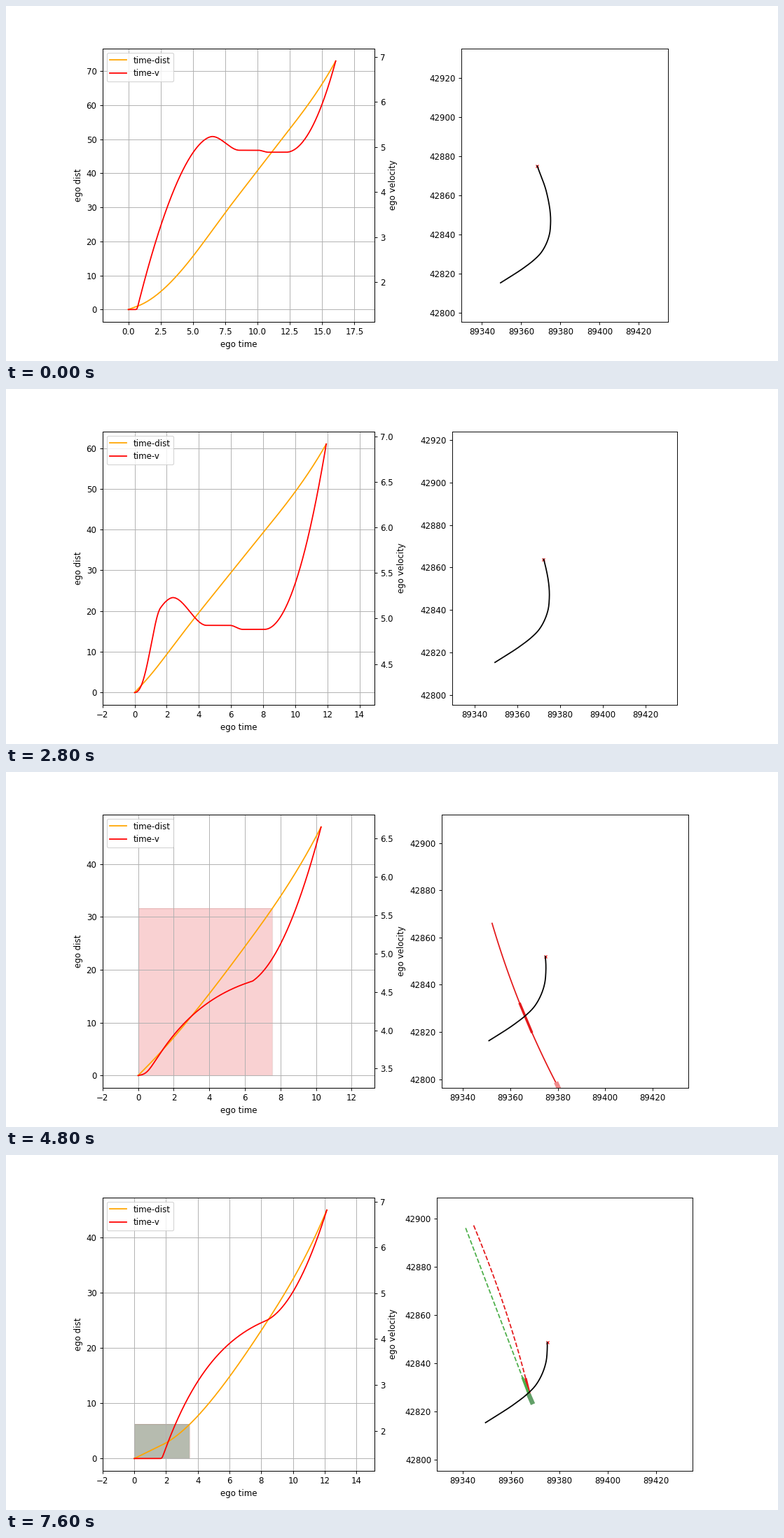
These frames come from a looping animation (1102x508 px, 8 s). A matplotlib script:

```python
import numpy as np
import matplotlib.pyplot as plt
from matplotlib.animation import FuncAnimation
from matplotlib.patches import Polygon, Rectangle

FRAMES = 20
BASE = np.array([89300.0, 42800.0])
RED, BLUE, GREEN, PURPLE, ORANGE = "#e41a1c", "#377eb8", "#4daf4a", "#984ea3", "#ff7f00"
TAN, PINK, MINT, MAUVE, SAGE = "#c0a08a", "#f9d1d2", "#dbefdb", "#afa5af", "#b6bbaf"

# Plan parameters at key frames, linear in between.
KEYS = [0, 3, 7, 9, 12, 14, 19]
PLAN = {
    "start": [0, .045, 0, .01, 0, -.07, 0],
    "end": [16.05, 14.13, 11.93, 10.9, 10.28, 11.86, 12.13],
    "v0": [1.39, 2.535, 4.187, 4.243, 3.41, 1.386, 1.392],
    "vmax": [6.904, 6.794, 6.914, 6.83, 6.648, 6.741, 6.82],
    "ease": [.1, .4, 1.6, 3, .1, .1, .1],
    "soft": [.03, .03, .03, .03, .07, .4, .03],
    "slow": [0, 0, 0, 0, .5, 1, 1],
    "dist": [73, 69, 61, 55, 47, 45, 45],
    "ego_y": [75.1, 72, 63.9, 58.5, 52, 48.6, 48.6],
    "trim": [0, 0, 0, 0, 1.75, 0, 0],
}
RUN_UP = 3.85  # length of the final acceleration in seconds

ROUTE = np.array([(68.2, 75.1), (72.9, 61.8), (75, 46), (74.5, 40.6), (72.9, 35.6),
                  (70, 30.6), (66.1, 26.7), (62.1, 23.6), (49.5, 15.4)])

# Predicted tracks: colour, line style, curve control point, end point, conflict section
FAN = [(c, "--", (63.5 + 4.1 * k, 45), (46.7 + 3.4 * k, 91.2 + 1.15 * k), (.06, .27))
       for c, k in ((PURPLE, -1), (BLUE, 1), (ORANGE, 0))]
SINGLE = [(RED, "-", (63, 29.6), (52.3, 66), (.35, .52))]
SPLIT = [(RED, "--", (63.9, 28), (49.4, 73.6), (.32, .5)),
         (BLUE, "--", (60.4, 35.6), (29.7, 6.7), (.37, .62)),
         (GREEN, "--", (61.6, 34.6), (29.7, 2.6), (.41, .71)),
         (PURPLE, "-", (68.9, 37.8), (55.8, 76.6), (.27, .43))]
PAIR = [(RED, "--", (60.4, 58.8), (44.6, 97.1), (.03, .12)),
        (GREEN, "--", (54.7, 60.6), (41.3, 96), (.03, .12))]


def step(x):
    x = np.clip(x, 0, 1)
    return x * x * (3 - 2 * x)


def plan(i):
    return {name: np.interp(i, KEYS, row) for name, row in PLAN.items()}


def bezier(a, b, c, t):
    t = np.asarray(t)[:, None]
    return (1 - t) ** 2 * np.array(a) + 2 * t * (1 - t) * np.array(b) + t * t * np.array(c)


def motion(p):
    """Time, distance and speed of the planned drive."""
    t = np.linspace(p["start"], p["end"], 400)
    turn = p["end"] - RUN_UP
    before, after = np.maximum(turn - t, 0), np.maximum(t - turn, 0)

    # Free road: launch, a hump, then two level stretches; a conflict replaces it by a slow climb.
    free = (.044 * step((before - 1.35) / .8) + .305 * step((before - 3.6) / 2.1)
            - .175 * np.maximum(before - 5.69, 0) ** 1.75)
    climb = .145 * before * np.exp(.177 * before)
    mix = min(1, 2 * p["slow"])
    level, slope = 4.88 - .48 * p["slow"], .16 * mix
    bend = (p["vmax"] - level - slope * RUN_UP) / RUN_UP ** 2
    v = level + (1 - mix) * free - p["slow"] * climb + slope * after + bend * after ** 2

    v = p["soft"] * np.logaddexp(p["v0"] / p["soft"], v / p["soft"])
    v = p["v0"] + (v - p["v0"]) * step((t - t[0]) / p["ease"])
    d = np.concatenate(([0], np.cumsum(v[1:] + v[:-1])))
    return t, d * round(p["dist"]) / d[-1], v


def make_route():
    """Arc length and points of a smooth curve through the route's key points."""
    s = np.concatenate(([0], np.cumsum(np.hypot(*np.diff(ROUTE, axis=0).T))))
    slope = np.gradient(ROUTE, s, axis=0)
    x = np.linspace(0, s[-1], 600)
    k = np.clip(np.searchsorted(s, x) - 1, 0, len(s) - 2)
    h = (s[k + 1] - s[k])[:, None]
    u = (x - s[k])[:, None] / h
    pts = (ROUTE[k] + (ROUTE[k + 1] - ROUTE[k]) * u * u * (3 - 2 * u)
           + h * u * (1 - u) * ((1 - u) * slope[k] - u * slope[k + 1]))
    return x, pts


ROUTE_S, ROUTE_XY = make_route()


def ahead(p):
    s0 = np.interp(-p["ego_y"], -ROUTE_XY[:, 1], ROUTE_S)
    s = np.linspace(s0, ROUTE_S[-1] - p["trim"], 200)
    return [BASE[k] + np.interp(s, ROUTE_S, ROUTE_XY[:, k]) for k in (0, 1)]


def scene(i):
    """Tracks, vehicle position and colour, and blocked spans (end time, colour)."""
    if i < 9:
        return [], None, None, []
    if i < 11:
        k = i - 9
        return FAN, (72.1 - 2.2 * k, 19.8 + 5.6 * k), "#c8713f", [(4.5 - .5 * k, TAN)]
    k = i - 12
    pos = 80.2 - 1.3 * k - .06 * k * k, -3.3 + 3.4 * k + .095 * k * k
    if i < 14:
        return SINGLE, pos, "#f08a8b", [(7.55 - .4 * k, PINK)]
    if i < 16:
        return SPLIT, pos, "#86688a", [(8 - .5 * k, MINT), (7.55 - .5 * k, MAUVE)]
    return PAIR, pos, "#62a068", [(7 - .5 * k, SAGE)]


def draw_profile(ax, p, spans):
    t, d, v = motion(p)
    for end, color in spans:
        box = (0, 0), end, np.interp(end, t, d)
        ax.add_patch(Rectangle(*box, fc=color, ec="none"))
        ax.add_patch(Rectangle(*box, fill=False, ec="#a0524a", alpha=.2))
    dist, = ax.plot(t, d, color="orange", label="time-dist")
    ax.set_xlabel("ego time")
    ax.set_ylabel("ego dist")
    ax.grid(True)
    twin = ax.twinx()
    vel, = twin.plot(t, v, color="red", label="time-v")
    twin.set_ylabel("ego velocity")
    ax.set_xlim(t[0] - 2, t[-1] + 3)
    ax.set_ylim(-.05 * d[-1], 1.05 * d[-1])
    pad = .05 * np.ptp(v)
    twin.set_ylim(v.min() - pad, v.max() + pad)
    ax.legend(handles=[dist, vel], loc="upper left")


def draw_vehicle(ax, pos, color):
    front, side = np.array([-.92, 2.11]), np.array([.87, .38])
    corners = [pos + a * front + b * side for a, b in ((1, 1), (1, -1), (-1, -1), (-1, 1))]
    ax.add_patch(Polygon(BASE + corners, fc=color, ec="none", zorder=2.3))


def draw_map(ax, p, tracks, pos, color):
    for c, style, control, end, conflict in tracks:
        curve = bezier(end, control, pos, np.linspace(0, 1, 60))
        ax.plot(*(BASE + curve).T, style, color=c)
        ax.plot(*(BASE + bezier(pos, control, end, conflict)).T, color=c, lw=3)
    if pos:
        draw_vehicle(ax, np.array(pos), color)
    x, y = ahead(p)
    ax.plot(x[0], y[0], "x", color="red", ms=4)
    ax.plot(x, y, color="black", zorder=2.5)
    ax.set_xlim(x.min() - 20, x.max() + 60)
    ax.set_ylim(y.min() - 20, y.max() + 60)
    ax.set_aspect("equal")


# 1102 by 508 pixels
fig = plt.figure(figsize=(12.9648, 5.9766), dpi=85)


def update(i):
    fig.clf()
    left, right = fig.subplots(1, 2)
    p = plan(i)
    tracks, pos, color, spans = scene(i)
    draw_profile(left, p, spans)
    draw_map(right, p, tracks, pos, color)
    return []


anim = FuncAnimation(fig, update, frames=FRAMES, interval=400, repeat=True, repeat_delay=0)
plt.show()
```
